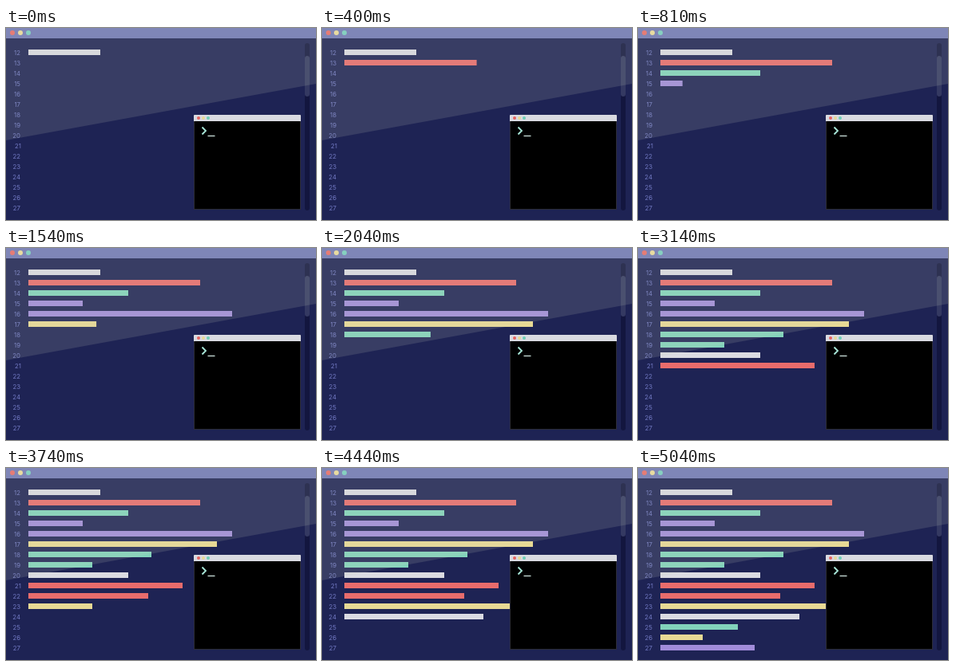
Write an HTML page that moves like this. It is 388x241 px and loops after 5140 ms.

```html
<!DOCTYPE html>
<html lang="en">
<head>
<meta charset="utf-8">
<title>Typing code</title>
<style>
html, body { margin: 0; width: 100%; height: 100%; overflow: hidden; background: #1e2354; }
svg { display: block; width: 388px; height: 241px; }
text { font: 7.8px Inter, sans-serif; fill: #737ac4; text-anchor: end; }
</style>
</head>
<body>
<svg viewBox="0 0 388 241">
  <rect width="388" height="241" fill="#1e2354"/>
  <rect x="374" y="19" width="6" height="210" rx="3" fill="#13163f"/>
  <rect x="374" y="35" width="6" height="51" rx="3" fill="#343962"/>
  <g id="numbers"></g>
  <g id="bars"></g>
  <path d="M0 13H388V70L0 141Z" fill="#c8cdbe" fill-opacity=".15"/>
  <rect width="388" height="13" fill="#7f86b7"/>
  <circle cx="8" cy="6" r="3" fill="#e67c75"/>
  <circle cx="18" cy="6" r="3" fill="#e8dba0"/>
  <circle cx="28" cy="6" r="3" fill="#86d0c0"/>
  <rect x="235.5" y="109.5" width="133" height="118" fill="#000" stroke="#2c2d38"/>
  <path d="M235 117V110q0-1 1-1H368q1 0 1 1V117Z" fill="#d9dae1"/>
  <circle cx="241" cy="113" r="2" fill="#e5625f"/>
  <circle cx="247" cy="113" r="2" fill="#e8d994"/>
  <circle cx="253" cy="113" r="2" fill="#6dcdb5"/>
  <path d="M245.5 124.5L250 129L245.5 133.5" fill="none" stroke="#a9e8da" stroke-width="1.8"/>
  <path d="M252.5 135.5H261.5" stroke="#d8eee9" stroke-width="1.2"/>
</svg>
<script>
const LOOP = 5140, FIRST_LINE = 12;
const WHITE = '#dbdbe2', RED = '#e86c6c', TEAL = '#82d3bb', PURPLE = '#a18cd9', YELLOW = '#e8d994';

// [colour, width, typing start, typing end]
const lines = [
  [WHITE, 90, -1, 0],
  [RED, 215, 0, 470],
  [TEAL, 125, 470, 755],
  [PURPLE, 68, 755, 890],
  [PURPLE, 255, 890, 1390],
  [YELLOW, 236, 1390, 1806],
  [TEAL, 154, 1806, 2140],
  [TEAL, 80, 2140, 2300],
  [WHITE, 125, 2300, 2658],
  [RED, 193, 2658, 3140],
  [RED, 150, 3140, 3560],
  [YELLOW, 212, 3560, 4037],
  [WHITE, 174, 4040, 4440],
  [TEAL, 97, 4440, 4640],
  [YELLOW, 53, 4640, 4770],
  [PURPLE, 118, 4770, 5040],
];

// The picture advances in steps: [from, step length]
const cadence = [[1840, 100], [1540, 60], [1110, 53.75], [570, 60], [50, 52], [0, 50]];

function add(parent, tag, attrs) {
  const node = document.createElementNS('http://www.w3.org/2000/svg', tag);
  for (const key in attrs) node.setAttribute(key, attrs[key]);
  return document.getElementById(parent).appendChild(node);
}

const bars = lines.map(([fill], i) => {
  const number = FIRST_LINE + i, y = 27 + 13 * i;
  add('numbers', 'text', { x: number === 21 ? 19 : 18, y: y + 7 }).textContent = number;
  return add('bars', 'rect', { x: 28, y, height: 7, width: 0, fill });
});

function stepped(t) {
  const [from, step] = cadence.find(([start]) => t >= start);
  return from + Math.floor((t - from) / step) * step;
}

function draw() {
  const t = stepped(performance.now() % LOOP);
  lines.forEach(([, width, start, end], i) => {
    const progress = Math.min(1, Math.max(0, (t - start) / (end - start)));
    bars[i].setAttribute('width', width * progress);
  });
  requestAnimationFrame(draw);
}
draw();
</script>
</body>
</html>
```
